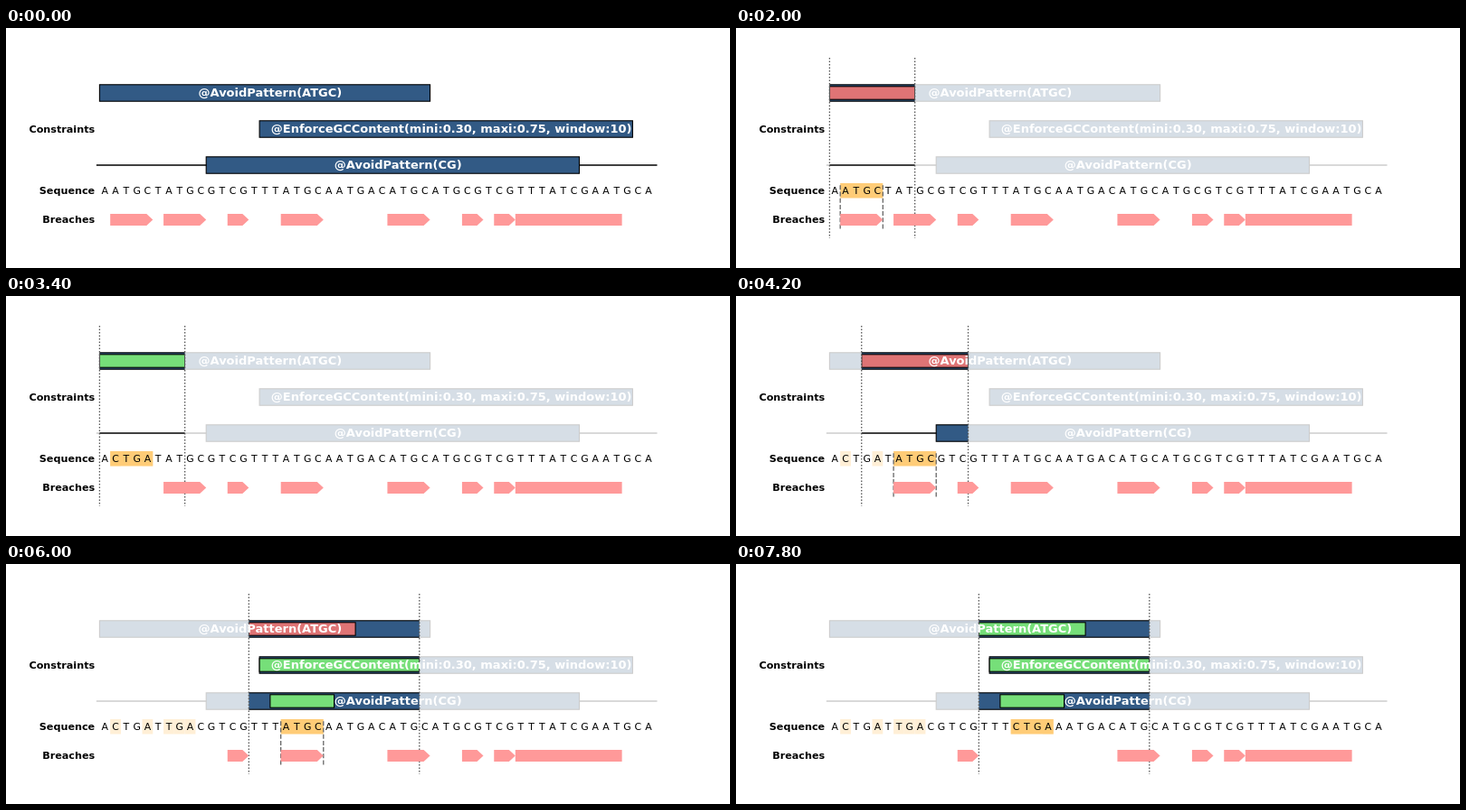
These frames come from a looping animation (800x266 px, 8 s). An HTML page:

```html
<!DOCTYPE html>
<html lang="en">
<head>
<meta charset="utf-8">
<title>Sequence optimization</title>
<style>
  html, body { margin: 0; height: 100%; overflow: hidden; background: #fff; }
  svg { display: block; width: 100%; height: 100%; }
  text { font-family: "DejaVu Sans", sans-serif; text-anchor: middle; }
  .label { font-size: 11.2px; font-weight: bold; text-anchor: end; }
  .title { font-size: 13px; font-weight: bold; fill: #fff; }
  .base { font-size: 10.9px; }
  .axis { stroke: #000; stroke-width: 1.5; }
  .bar { fill: #325a85; stroke: #000; stroke-width: 1.1; }
  .fail { fill: #df7475; stroke: #000; stroke-width: 1.1; }
  .pass { fill: #76df79; stroke: #000; stroke-width: 1.1; }
  .veil { fill: #fff; fill-opacity: .8; }
  .breach { fill: #f99; }
  .active { fill: #ffcc77; }
  .edited { fill: #ffefd6; }
  .window { stroke: #555; stroke-width: 1.3; stroke-dasharray: 1.4 2.1; }
  .site { stroke: #666; stroke-width: 1.3; stroke-dasharray: 5 2.2; }
</style>
</head>
<body>
<svg id="stage" viewBox="0 0 800 266"></svg>
<script>
const stage = document.getElementById('stage');
const sequence = 'AATGCTATGCGTCGTTTATGCAATGACATGCATGCGTCGTTTATCGAATGCA';

const constraints = [
  { y: 72, from: 0, to: 31, name: '@AvoidPattern(ATGC)' },
  { y: 112, from: 15, to: 50, name: '@EnforceGCContent(mini:0.30, maxi:0.75, window:10)' },
  { y: 152, from: 10, to: 45, name: '@AvoidPattern(CG)' }
];

// [from, to] in sequence positions; the last breach has no strand
const breaches = [[1, 5], [6, 10], [12, 14], [17, 21], [27, 31], [34, 36], [37, 39], [39, 49]];

// Each fix shows a failing step, then a solved one. checks: [constraint, from, to]
const fixes = [
  { window: [0, 8], at: 1, bases: 'CTGA', breach: 0, checks: [[0, 0, 8]] },
  { window: [3, 13], at: 6, bases: 'TGAC', breach: 1, checks: [[0, 3, 13]] },
  { window: [14, 30], at: 17, bases: 'CTGA', breach: 3,
    checks: [[0, 14, 24], [1, 15, 30], [2, 16, 22]] }
];

const px = i => +(103.4 + 11.78 * i).toFixed(2);
const rect = (cls, from, to, y, h) =>
  `<rect class="${cls}" x="${px(from)}" y="${y}" width="${px(to) - px(from)}" height="${h}"/>`;
const line = (cls, from, to, y1, y2) =>
  `<line class="${cls}" x1="${px(from)}" x2="${px(to)}" y1="${y1}" y2="${y2}"/>`;
const text = (cls, x, y, content) => `<text class="${cls}" x="${x}" y="${y}">${content}</text>`;

function breachShape([from, to], index) {
  const a = px(from), b = px(to);
  const neck = index === breaches.length - 1 ? b : b - 7;
  return `<path class="breach" d="M${a} 206H${neck}L${b} 212.5L${neck} 219H${a}Z"/>`;
}

function draw(step) {
  const current = Math.ceil(step / 2) - 1;
  const fix = fixes[current];
  const solved = step % 2 === 0;
  const applied = fixes.slice(0, Math.floor(step / 2));
  const bases = [...sequence];
  const edited = new Set();
  for (const { at, bases: fresh } of applied) {
    [...fresh].forEach((base, k) => {
      if (bases[at + k] !== base) edited.add(at + k);
      bases[at + k] = base;
    });
  }

  let out = line('axis', -.3, 52.3, 152, 152);
  for (const c of constraints) out += rect('bar', c.from, c.to, c.y - 9.2, 18.4);

  if (fix) {
    const [start, end] = fix.window;
    fix.checks.forEach(([row, from, to], k) => {
      out += rect(k === 0 && !solved ? 'fail' : 'pass', from, to, constraints[row].y - 7.2, 14.4);
    });
    out += rect('veil', -1, start, 55, 110) + rect('veil', end, 54, 55, 110);
    for (const i of edited) out += rect('edited', i, i + 1, 172, 16.5);
    out += rect('active', fix.at, fix.at + 4, 172, 16.5);
    for (const i of fix.window) out += line('window', i, i, 33, 233);
    if (!solved) {
      for (const i of breaches[fix.breach]) out += line('site', i, i, 222.5, 172);
    }
  }

  for (const c of constraints) {
    out += text('title', px((c.from + c.to + 1) / 2), c.y + 4.2, c.name);
  }
  out += text('label', 98.2, 116, 'Constraints')
    + text('label', 98.2, 184, 'Sequence')
    + text('label', 98.2, 216, 'Breaches');
  bases.forEach((base, i) => { out += text('base', px(i + .5), 184, base); });

  const gone = applied.map(f => f.breach);
  breaches.forEach((b, i) => { if (!gone.includes(i)) out += breachShape(b, i); });
  stage.innerHTML = out;
}

let shown = -1;
function tick() {
  const step = Math.max(0, Math.floor(performance.now() % 8000 / 1000) - 1);
  if (step !== shown) draw(shown = step);
  requestAnimationFrame(tick);
}
tick();
</script>
</body>
</html>
```
